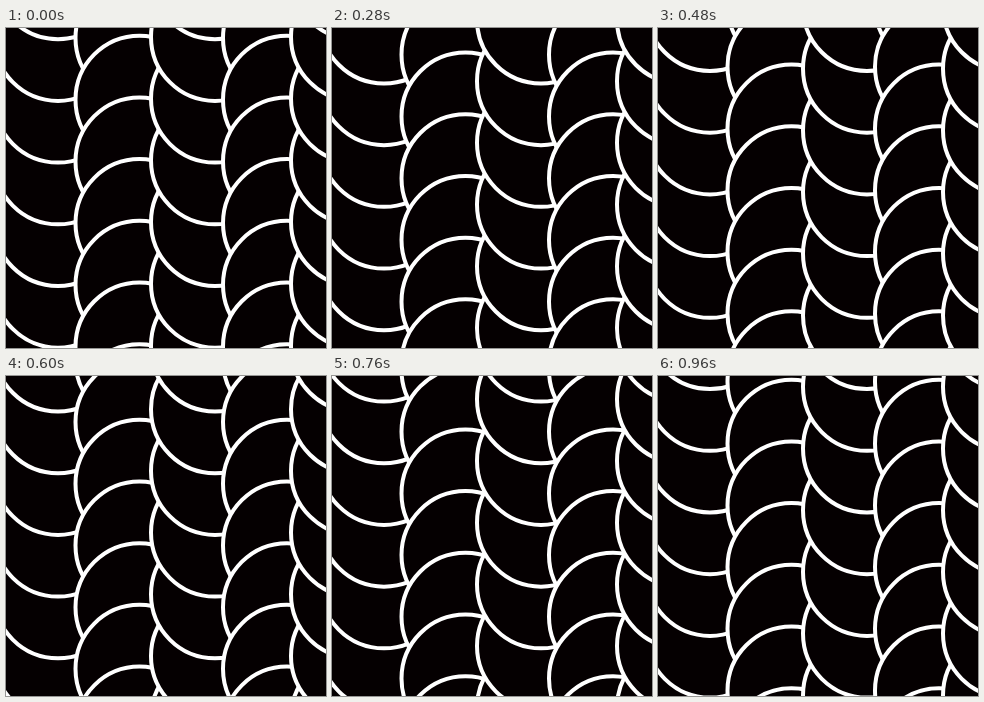
Write an HTML page that moves like this. It is 320 px wide and 320 px high and loops after 1000 ms.

```html
<!DOCTYPE html>
<html lang="en">
<head>
<meta charset="utf-8">
<title>Sliding scales</title>
<style>
  html, body { margin: 0; width: 100%; height: 100%; overflow: hidden; background: #050001; }
  svg { display: block; width: 100vw; height: 100vh; }
  circle { fill: #050001; stroke: #fff; stroke-width: 4; }
</style>
</head>
<body>
<svg viewBox="0 0 320 320"></svg>
<script>
const LOOP = 1000, STEP = 40;
const R = 64, GAP = 61.7;
// Signed travel per loop, and the centre of one disc at the loop start.
const UP = { travel: -62.3, cy: 72.9 - R };
const DOWN = { travel: 60.1, cy: 7.7 + R };
const svg = document.querySelector('svg');

function make(name, parent, attrs = {}) {
  const el = document.createElementNS('http://www.w3.org/2000/svg', name);
  for (const key in attrs) el.setAttribute(key, attrs[key]);
  return parent.appendChild(el);
}

// Each column covers the one to its left; discs stack in their direction of travel.
function makeColumn(cx, { travel, cy }) {
  const group = make('g', svg);
  for (let i = -4; i <= 8; i++) {
    const row = travel > 0 ? i : 4 - i;
    make('circle', group, { cx, cy: cy + row * GAP, r: R });
  }
  return { group, travel };
}

const columns = [
  makeColumn(52, UP),
  makeColumn(133.5, DOWN),
  makeColumn(209, UP),
  makeColumn(281, DOWN),
  makeColumn(349, UP)
];

function draw(ms) {
  const time = Math.floor((ms % LOOP) / STEP) * STEP;
  for (const { group, travel } of columns) {
    group.setAttribute('transform', `translate(0 ${travel * time / LOOP})`);
  }
}

const start = performance.now();
function tick() {
  draw(performance.now() - start);
  requestAnimationFrame(tick);
}
draw(0);
requestAnimationFrame(tick);
</script>
</body>
</html>
```
